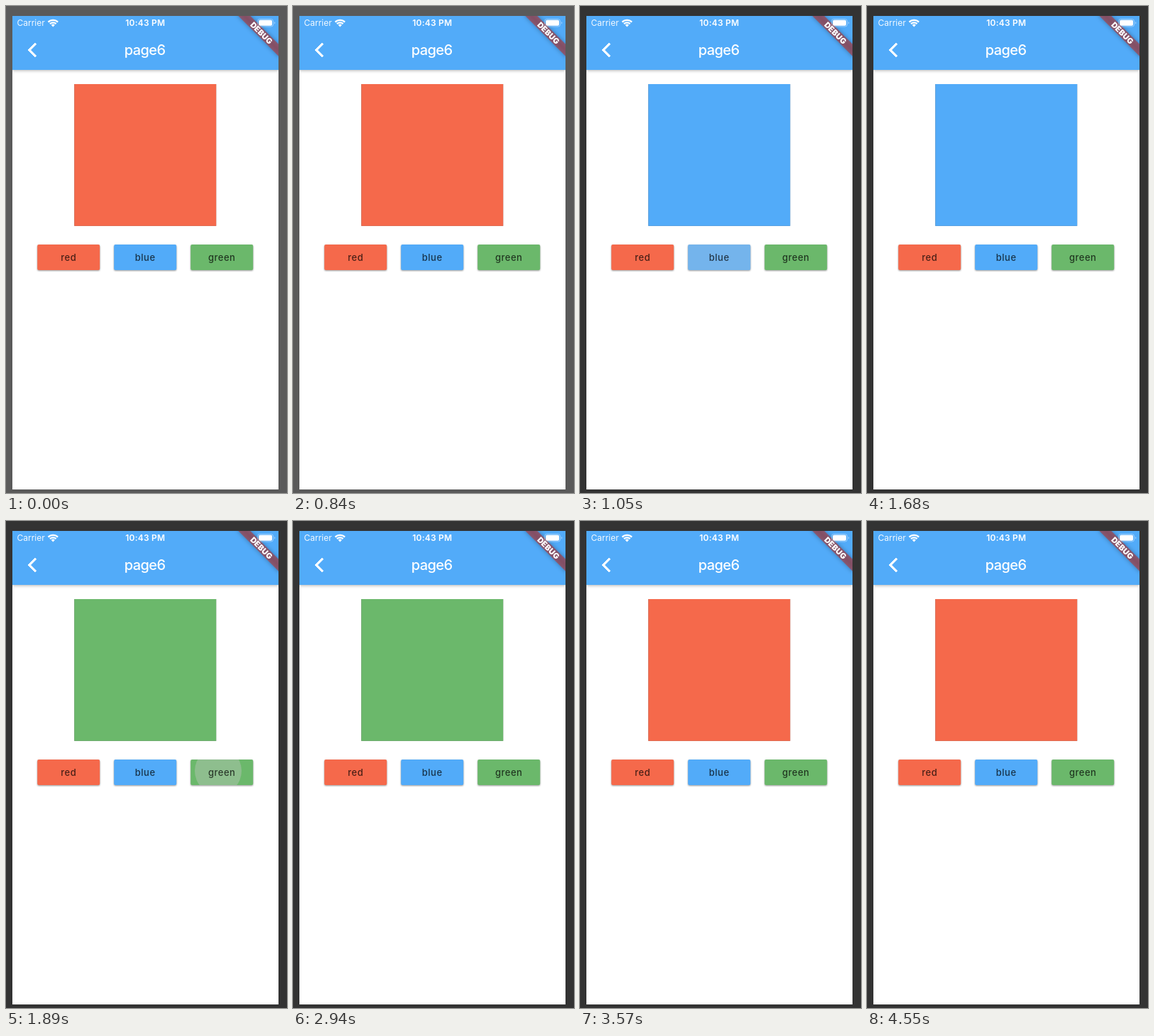
Animation of 396 by 686 pixels, one loop 4.76 s. Source, as an HTML page:

```html
<!DOCTYPE html>
<html lang="en">
<head>
<meta charset="utf-8">
<title>Color buttons</title>
<style>
  html, body { margin: 0; width: 100%; height: 100%; overflow: hidden; background: #333; }
  svg { display: block; width: 396px; height: 686px; font-family: Inter, Roboto, sans-serif; }
  .mid { text-anchor: middle; }
  .bar { filter: drop-shadow(0 1.5px 2px rgba(0, 0, 0, .3)); }
  .card { filter: drop-shadow(.4px .4px .6px rgba(0, 0, 0, .6)); }
  .button { filter: drop-shadow(.2px 1px 1.1px rgba(0, 0, 0, .42)); }
  .label { font-size: 13px; font-weight: 500; letter-spacing: .5px; fill: rgba(0, 0, 0, .7); }
  .ribbon { filter: drop-shadow(0 0 3px rgba(0, 0, 0, .5)); }
</style>
</head>
<body>
<svg viewBox="0 0 396 686">
  <defs>
    <clipPath id="screen"><rect x="9" y="14" width="375" height="667"/></clipPath>
  </defs>
  <rect id="backdrop" width="396" height="686"/>
  <g clip-path="url(#screen)">
    <rect x="9" y="14" width="375" height="667" fill="#fff"/>
    <rect class="bar" x="9" y="14" width="375" height="76" fill="#52abf9"/>
    <path transform="translate(31 50)" fill="#fff" stroke="#fff" stroke-width=".9"
      d="M11.67 3.87 9.9 2.1 0 12l9.9 9.9 1.77-1.77L3.54 12z"/>
    <text class="mid" x="195.7" y="69" font-size="20" font-weight="500" letter-spacing="-.6" fill="#fff">page6</text>

    <rect id="card" class="card" x="96.3" y="110" width="199.9" height="199.8"/>
    <g id="buttons"></g>

    <g transform="translate(384 14) rotate(45)">
      <rect class="ribbon" x="-42" y="28" width="84" height="12" fill="#ae383c" fill-opacity=".63"/>
      <text class="mid" y="38" font-size="11" font-weight="900" letter-spacing=".1" fill="#fff">DEBUG</text>
    </g>

    <g fill="#fff">
      <text x="15.5" y="28.4" font-size="12" fill-opacity=".92">Carrier</text>
      <text class="mid" x="196.3" y="28.4" font-size="12" font-weight="600" letter-spacing=".2">10:43 PM</text>
      <g transform="translate(66.3 29.4)">
        <path d="M0 0-2.6-2.6A3.7 3.7 0 0 1 2.6-2.6Z"/>
        <path d="M-4.3-4.3A6.1 6.1 0 0 1 4.3-4.3M-6.8-6.8A9.6 9.6 0 0 1 6.8-6.8"
          fill="none" stroke="#fff" stroke-width="2.3"/>
      </g>
      <rect x="354.5" y="18.5" width="22" height="10.5" rx="3" fill="none" stroke="#fff" stroke-opacity=".4"/>
      <rect x="356.2" y="19.8" width="18.8" height="8" rx="1.8"/>
      <path d="M378.2 22v3.6a2 2 0 0 0 0-3.6z" fill-opacity=".5"/>
    </g>
  </g>
</svg>
<script>
  const LOOP = 4760, STEP = 70, FADE = 270, FOCUS = 910;
  const NS = "http://www.w3.org/2000/svg";
  const colors = { red: "#f5694b", blue: "#52abf9", green: "#6bb86b" };

  // Each tap recolors the card and starts a splash where the pointer was.
  const taps = [
    { name: "blue", at: 980, x: 196, y: 352 },
    { name: "green", at: 1890, x: 299, y: 352 },
    { name: "red", at: 3010, x: 104, y: 349 }
  ];

  const backdrop = document.getElementById("backdrop");
  const card = document.getElementById("card");
  const buttons = document.getElementById("buttons");
  const splashes = {};

  function add(parent, tag, attrs, text = "") {
    const el = document.createElementNS(NS, tag);
    for (const key in attrs) el.setAttribute(key, attrs[key]);
    el.textContent = text;
    return parent.appendChild(el);
  }

  Object.keys(colors).forEach((name, i) => {
    const box = { x: 44.2 + i * 108, y: 336, width: 88, height: 36, rx: 2 };
    const clip = add(buttons, "clipPath", { id: "clip-" + name });
    add(clip, "rect", box);
    add(buttons, "rect", { ...box, class: "button", fill: colors[name] });
    const inside = add(buttons, "g", { "clip-path": `url(#clip-${name})` });
    splashes[name] = add(inside, "circle", { fill: "#c8c8c8", opacity: 0 });
    add(buttons, "text", { x: box.x + 44, y: 358.6, class: "mid label" }, name);
  });

  function draw(time) {
    const t = Math.floor((time % LOOP) / STEP) * STEP;
    let current = "red";
    for (const { name, at, x, y } of taps) {
      const age = t - at;
      if (age >= 0) current = name;
      const alpha = age < 0 ? 0 : Math.max(0, 0.38 * (1 - age / FADE));
      const splash = splashes[name];
      splash.setAttribute("cx", x);
      splash.setAttribute("cy", y);
      splash.setAttribute("r", 33 + Math.max(0, age));
      splash.setAttribute("opacity", alpha);
    }
    card.setAttribute("fill", colors[current]);
    backdrop.setAttribute("fill", t < FOCUS ? "#5a5a5a" : "#333");
  }

  const start = performance.now();
  function tick() {
    draw(performance.now() - start);
    requestAnimationFrame(tick);
  }
  tick();
</script>
</body>
</html>
```
